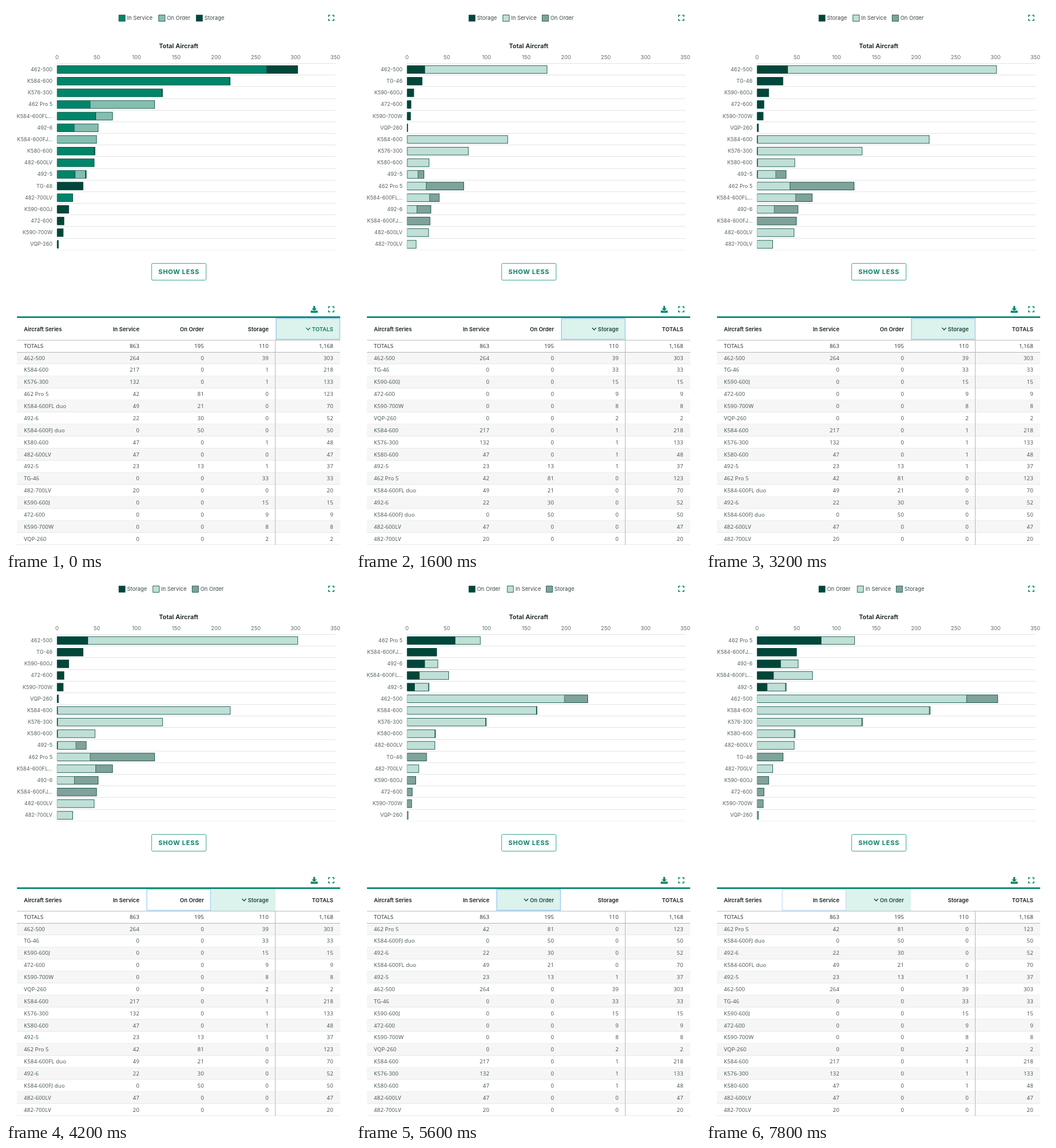
An HTML page with a canvas that plays this animation: 596x940 px, repeating every 8 s.

```html
<!DOCTYPE html>
<html lang="en">
<head>
<meta charset="utf-8">
<title>Total Aircraft</title>
<style>
html, body { margin: 0; width: 100%; height: 100%; overflow: hidden; background: #fff; }
canvas { display: block; }
</style>
</head>
<body>
<canvas id="stage" width="596" height="940"></canvas>
<script>
const ctx = document.getElementById('stage').getContext('2d');
const GREEN = '#00856a', DARK = '#00463a', PALE = '#bfdfd7', GREY = '#7fa29b';
const UI = 'Inter, sans-serif', BODY = '"Open Sans", sans-serif';
const LOOP = 8000, STEP = 200, GROW = 2980;

// name, in service, on order, storage
const fleet = [
  ['462-500', 264, 0, 39], ['K584-600', 217, 0, 1], ['K576-300', 132, 0, 1],
  ['462 Pro 5', 42, 81, 0], ['K584-600FL duo', 49, 21, 0], ['492-6', 22, 30, 0],
  ['K584-600FJ duo', 0, 50, 0], ['K580-600', 47, 0, 1], ['482-600LV', 47, 0, 0],
  ['492-5', 23, 13, 1], ['TG-46', 0, 0, 33], ['482-700LV', 20, 0, 0],
  ['K590-600J', 0, 0, 15], ['472-600', 0, 0, 9], ['K590-700W', 0, 0, 8],
  ['VQP-260', 0, 0, 2]
].map(([name, ...n]) => ({ name, n: [...n, n[0] + n[1] + n[2]] }));
const columns = ['In Service', 'On Order', 'Storage', 'TOTALS'];

const sortBy = (rows, col) => [...rows].sort((a, b) => b.n[col] - a.n[col]);
const byStorage = sortBy(fleet, 2);

// series: [column, colour, legend x]
const views = [
  { from: 0, grow: -GROW, col: 3, bars: fleet, rows: fleet,
    series: [[0, GREEN, 195], [1, '#83beb1', 264], [2, DARK, 329]] },
  { from: 1200, grow: 1016, col: 2, bars: byStorage, rows: byStorage,
    series: [[2, DARK, 195], [0, PALE, 254], [1, GREY, 322]] },
  { from: 4800, grow: 4725, col: 1, bars: sortBy(fleet, 1), rows: sortBy(byStorage, 1),
    series: [[1, DARK, 195], [0, PALE, 261.5], [2, GREY, 329]] }
];
const focuses = [
  { from: -1000, col: 3 }, { from: 400, col: 2 },
  { from: 4000, col: 1 }, { from: 7800, col: 0 }
];
const current = (list, t) => list.filter(e => e.from <= t).pop();

function rect(x, y, w, h, color) {
  ctx.fillStyle = color;
  ctx.fillRect(x, y, w, h);
}

// y is the middle of the capitals
function text(s, x, y, font, color, align = 'left', spacing = 0) {
  ctx.font = font;
  ctx.fillStyle = color;
  ctx.textAlign = align;
  ctx.letterSpacing = spacing + 'px';
  ctx.fillText(s, x, y + 3.4);
  return ctx.measureText(s).width;
}

function line(color, width, ...paths) {
  ctx.strokeStyle = color;
  ctx.lineWidth = width;
  ctx.beginPath();
  for (const p of paths) p.forEach(([x, y], i) => i ? ctx.lineTo(x, y) : ctx.moveTo(x, y));
  ctx.stroke();
}

function expandIcon(cx, cy) {
  const corner = (sx, sy) => [[1.8, 4.5], [4.5, 4.5], [4.5, 1.8]].map(([x, y]) => [cx + sx * x, cy + sy * y]);
  line(GREEN, 1.6, corner(1, 1), corner(-1, 1), corner(1, -1), corner(-1, -1));
}

function downloadIcon(x, y) {
  rect(x, y + 8, 12, 3.8, GREEN);
  const head = [[x + 1.8, y + 4.4], [x + 10.2, y + 4.4], [x + 6, y + 8.6]];
  line('#fff', 2, head.slice(1), [head[2], head[0]]);
  line(GREEN, 0.3, head);
  ctx.fillStyle = GREEN;
  ctx.fill();
  rect(x + 4.4, y, 3.2, 5, GREEN);
}

function drawChart(view, t) {
  for (const [col, color, x] of view.series) {
    rect(x + 0.2, 15.2, 11.6, 11.6, DARK);
    rect(x + 1, 16, 10, 10, color);
    text(columns[col], x + 14.7, 20.7, `9.4px ${UI}`, '#3c4a46');
  }
  expandIcon(563.5, 20.5);
  text('Total Aircraft', 299, 69.3, `600 10.9px ${UI}`, '#0e1c18', 'center');

  const left = 88.5, unit = 482 / 350, pitch = 20.17, top = 99.6;
  for (let v = 0; v <= 350; v += 50) text(v, left + v * unit, 88.3, `9.2px ${UI}`, '#5c6a66', 'center');
  for (let i = 0; i <= 16; i++) rect(88, Math.floor(top + i * pitch), 483, 1, i < 16 ? '#e4e4e4' : '#f0f0f0');

  const u = Math.min(1, (t - view.grow) / GROW);
  const scale = unit * (1 - (1 - u) ** 4);
  const edge = 0.8, height = 14.4;
  view.bars.forEach((plane, i) => {
    const mid = top + (i + 0.5) * pitch, y = mid - 6.9;
    const label = plane.name.length > 10 ? plane.name.slice(0, 10) + '…' : plane.name;
    text(label, 80.5, mid - 0.2, `9px ${UI}`, '#56645f', 'right');
    let x = left;
    for (const [col, color] of view.series) {
      const w = plane.n[col] * scale;
      if (!w) continue;
      rect(x, y, w, height, DARK);
      if (w > edge) rect(x, y + edge, w - edge, height - 2 * edge, color);
      x += w;
    }
  });
}

function drawButton() {
  ctx.strokeStyle = '#3aa38c';
  ctx.lineWidth = 1;
  ctx.beginPath();
  ctx.roundRect(252.3, 445.6, 94.4, 29, 2);
  ctx.stroke();
  text('SHOW LESS', 299.6, 460.7, `700 11px ${UI}`, '#0a806a', 'center', 0.7);
}

function drawHeader(view, t) {
  const head = `600 9.5px ${UI}`;
  const focus = current(focuses, t);
  const cellX = col => 131 + col * 112;
  rect(cellX(view.col), 540, 112, 38, '#dcf2ec');
  ctx.globalAlpha = [0.55, 0.85][Math.floor((t - focus.from) / STEP)] ?? 1;
  ctx.strokeStyle = '#a8d4f5';
  ctx.lineWidth = 1.7;
  ctx.strokeRect(cellX(focus.col) + 1, 541, 110.3, 36);
  ctx.globalAlpha = 1;

  text('Aircraft Series', 31, 559.3, head, '#15231f');
  columns.forEach((name, col) => {
    const sorted = col === view.col, right = 231 + col * 112;
    const color = !sorted ? '#15231f' : col === 3 ? '#0b7d66' : '#1d4a40';
    const w = text(name, right, 559.3, head, color, 'right');
    if (sorted) {
      const x = right - w - 6.5;
      line(color, 1.4, [[x - 3.5, 557], [x, 560.7], [x + 3.5, 557]]);
    }
  });
}

function drawRow(name, values, y, color) {
  const font = `9.5px ${BODY}`;
  text(name, 31, y, font, color, 'left', 0.15);
  values.forEach((v, col) => text(v.toLocaleString('en-US'), 231 + col * 112, y, font, color, 'right', 0.15));
}

function drawTable(view, t) {
  downloadIcon(528, 519.3);
  expandIcon(563.5, 525);
  rect(19, 537.3, 560, 2.7, GREEN);
  drawHeader(view, t);

  const sums = columns.map((_, col) => fleet.reduce((sum, p) => sum + p.n[col], 0));
  drawRow('TOTALS', sums, 588.3, '#1f2f2b');
  const pitch = 20.87, top = 599;
  view.rows.forEach((plane, i) => {
    const y = top + i * pitch;
    if (i % 2 === 0) rect(19, y, 560, pitch, '#f6f6f6');
    rect(19, y + pitch - 0.8, 560, 0.8, '#e4e4e4');
    drawRow(plane.name, plane.n, y + 10.2, '#3f524c');
  });
  rect(19, 578, 560, 1, '#bdbdbd');
  rect(19, 599, 560, 1, '#b4b4b4');
  rect(466, 578, 1, 355, '#b8b8b8');
}

function frame() {
  // the motion advances in even steps
  const t = Math.floor(performance.now() % LOOP / STEP) * STEP;
  const view = current(views, t);
  rect(0, 0, 596, 940, '#fff');
  drawChart(view, t);
  drawButton();
  drawTable(view, t);
  requestAnimationFrame(frame);
}
frame();
</script>
</body>
</html>
```
